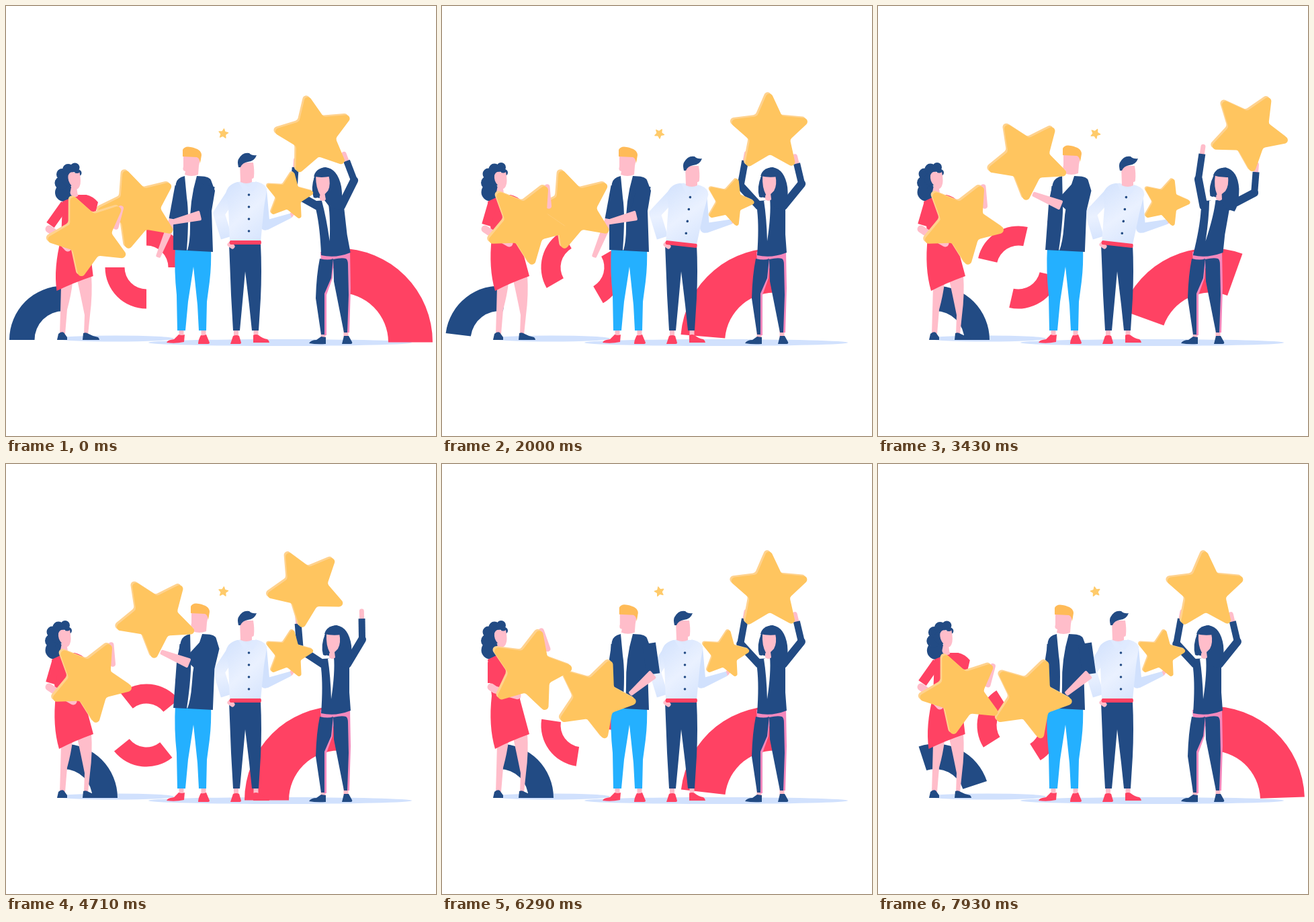
An HTML page with a canvas for the animation above (8 s loop, 640 by 640 pixels).

```html
<!DOCTYPE html>
<html lang="en">
<head>
<meta charset="utf-8">
<title>Team with stars</title>
<style>
html, body { margin: 0; height: 100%; overflow: hidden; background: #fff; }
canvas { display: block; width: 100vw; height: 100vh; }
</style>
</head>
<body>
<canvas id="stage"></canvas>
<script>
const LOOP = 8000;
const NAVY = '#224b84', RED = '#ff4263', SKIN = '#ffbdca', GOLD = '#ffc55f', EDGE = '#ffd28e';
const BLUE = '#24b0ff', ICE = '#d1e1fd', PALE = '#eaf1ff', HAIR = '#ffbb58', ROSE = '#f589bd';

const canvas = document.getElementById('stage');
const ctx = canvas.getContext('2d');
const density = Math.max(1, window.devicePixelRatio || 1);
canvas.width = canvas.height = 640 * density;

// ---- motion ----
// Eased step from 0 to 1 between two times, and a step up followed by a step down.
function ramp(t, from, to) {
  const u = Math.min(1, Math.max(0, (t - from) / (to - from)));
  return 0.5 - 0.5 * Math.cos(Math.PI * u);
}
const pulse = (t, up, top, down, end) => ramp(t, up, top) - ramp(t, down, end);

// Point at a distance and clockwise angle from straight up.
function polar(x, y, r, degrees) {
  const a = degrees * Math.PI / 180;
  return [x + r * Math.sin(a), y - r * Math.cos(a)];
}

// Elbow of an arm with two bones; side picks the direction it bends.
function elbow([sx, sy], [hx, hy], upper, fore, side) {
  const d = Math.min(Math.hypot(hx - sx, hy - sy), upper + fore);
  const bend = Math.acos((upper * upper + d * d - fore * fore) / (2 * upper * d));
  const a = Math.atan2(hy - sy, hx - sx) + side * bend;
  return [sx + upper * Math.cos(a), sy + upper * Math.sin(a)];
}

// ---- drawing ----
function shape(color, d) {
  ctx.fillStyle = color;
  ctx.fill(new Path2D(d));
}

function disc(color, x, y, rx, ry = rx) {
  ctx.beginPath();
  ctx.ellipse(x, y, rx, ry, 0, 0, 7);
  ctx.fillStyle = color;
  ctx.fill();
}

function line(color, width, points, cap = 'round') {
  ctx.beginPath();
  points.forEach(p => ctx.lineTo(...p));
  ctx.lineWidth = width;
  ctx.lineCap = cap;
  ctx.lineJoin = 'round';
  ctx.strokeStyle = color;
  ctx.stroke();
}

function roundPoly(color, points, radius) {
  const middle = (p, q) => [(p[0] + q[0]) / 2, (p[1] + q[1]) / 2];
  ctx.beginPath();
  ctx.moveTo(...middle(points[0], points[points.length - 1]));
  points.forEach((p, i) => ctx.arcTo(...p, ...middle(p, points[(i + 1) % points.length]), radius));
  ctx.closePath();
  ctx.fillStyle = color;
  ctx.fill();
}

function taper(color, [x0, y0], w0, [x1, y1], w1) {
  const a = Math.atan2(y1 - y0, x1 - x0), nx = Math.sin(a) / 2, ny = -Math.cos(a) / 2;
  roundPoly(color, [[x0 + nx * w0, y0 + ny * w0], [x1 + nx * w1, y1 + ny * w1],
    [x1 - nx * w1, y1 - ny * w1], [x0 - nx * w0, y0 - ny * w0]], 2);
}

function within(apply, draw) {
  ctx.save();
  apply();
  draw();
  ctx.restore();
}
const moved = (x, y, draw) => within(() => ctx.translate(x, y), draw);
// Slides the points at the given height above the base sideways.
const sheared = (shift, base, height, draw) =>
  within(() => ctx.transform(1, 0, -shift / height, 1, shift * base / height, 0), draw);
const turned = (degrees, x, y, draw) => within(() => {
  ctx.translate(x, y);
  ctx.rotate(degrees * Math.PI / 180);
  ctx.translate(-x, -y);
}, draw);

// Quarter ring; the angle is its clockwise end, counted up from the right.
function ring(color, x, y, outer, inner, angle) {
  const end = -angle * Math.PI / 180, start = end - Math.PI / 2;
  ctx.beginPath();
  ctx.arc(x, y, outer, start, end);
  ctx.arc(x, y, inner, end, start, true);
  ctx.closePath();
  ctx.fillStyle = color;
  ctx.fill();
}

function flatStar(color, x, y, size, turn) {
  const points = Array.from({ length: 10 }, (_, i) =>
    polar(x, y, size * (i % 2 ? 0.525 : 1.11), turn + i * 36));
  roundPoly(color, points, size * 0.09);
}

function star(x, y, size, turn) {
  const d = size / 40;
  flatStar(EDGE, x - d * 1.4, y - d * 1.2, size, turn);
  flatStar(GOLD, x + d * 0.3, y + d * 0.3, size, turn);
}

function ankles(x1, x2) {
  [x1, x2].forEach(x => line(SKIN, 7, [[x, 480], [x, 493]], 'butt'));
}

// ---- background ----
function background(t) {
  disc(ICE, 163, 495, 87, 4.6);
  disc(ICE, 408, 501, 196, 5);
  ring(RED, 495, 500.5, 140, 74,
    87 * ramp(t, 0, 2200) - 35 * ramp(t, 2200, 2750) + 38 * ramp(t, 2750, 4150) - 90 * ramp(t, 5900, 8150));
  ring(NAVY, 85.5, 497, 80.5, 43, 90 - 90 * pulse(t, 1680, 3440, 7414, 9164));
  const spin = -0.03 * t;
  ring(RED, 209, 389, 61.5, 32.5, spin);
  ring(RED, 209, 389, 61.5, 32.5, spin + 180);
  flatStar('#ffcb6b', 323.5, 190, 8, 8 + 24 * Math.sin(t / 1480));
}

// ---- woman in the tracksuit ----
function raisedArm(shoulder, wrist, upper, fore, side) {
  const bend = elbow(shoulder, wrist, upper, fore, side);
  const dx = wrist[0] - bend[0], dy = wrist[1] - bend[1], k = 11 / Math.hypot(dx, dy);
  line(SKIN, 7, [wrist, [wrist[0] + dx * k, wrist[1] + dy * k]]);
  line(NAVY, 12, [shoulder, bend]);
  line(NAVY, 10, [bend, wrist], 'butt');
}

function trackWoman(t) {
  const start = 1 - ramp(t, 0, 860);
  const sway = pulse(t, 1950, 2900, 3450, 4450);
  const fling = pulse(t, 4250, 4710, 4710, 5450);
  const hop = pulse(t, 3900, 4300, 4300, 4700);
  const lean = 1.57 * sway - start;
  const x = 487 + 65 * sway - 40 * fling - 28 * start;
  const y = 189 - 2 * sway - 5 * fling + 4 * start - 9 * hop;
  const turn = -1 + 32 * sway - 28 * fling - 10 * start;

  // The hands slip off the star when it tips far.
  const slip = Math.max(0, turn) * 0.55, loose = Math.max(0, -turn - 11) * 1.4;
  const [lx, ly] = polar(x, y, 55, turn + 222);
  const [rx, ry] = polar(x, y, 61, turn + 139);

  ankles(472, 506);
  shape(ROSE, 'M468 366L512 364L513 420L511 486H506L500 400L487 390L486 405L477 430V490H473L470 400Z');
  shape(NAVY, 'M467 376Q480 379 487 376L484 405L474 428V489H469L461 435Q462 400 467 376Z');
  shape(NAVY, 'M487 377Q500 374 506 376Q509 378 509 385L510 430L508 486H503L488 410Z');
  shape(NAVY, 'M451 502Q454 497 462 497L469 492L476 493V503Q462 504 451 502Z');
  shape(NAVY, 'M500 503L503 491H510L515 500Q516 503 513 503Z');

  raisedArm([472 + lean * 8, 298], [lx - slip, ly + slip], 41, 38, -1);
  raisedArm([508 + lean * 9, 298], [rx + loose, ry + loose], 43, 31, 1);
  sheared(lean * 9, 370, 80, () => {
    shape(NAVY, 'M471 290L504 288Q512 291 511 304L511 340L513 367Q490 376 469 371Q472 330 469 304Z');
    shape('#fff', 'M479 290L488 287Q490 310 484 350Q483 315 479 290Z');
  });
  moved(lean * 14, 0, () => turned(lean * 3, 489, 288, () => {
    shape(NAVY, 'M474 256Q478 241 492 240Q510 243 514 270Q516 294 510 304L496 301L486 286L478 285Z');
    shape(SKIN, 'M476 252H496Q499 266 494 275L489 280L490 288Q486 292 481 288V281Q474 272 476 252Z');
    shape(NAVY, 'M475 253Q468 270 472 284Q477 287 482 281Q476 270 477 253Z');
    shape(NAVY, 'M474 253Q477 241 492 240Q500 243 499 254Q486 256 474 253Z');
  }));
  star(x, y, 60, turn);
}

// ---- man in the shirt ----
function shade(x0, y0, x1, y1) {
  const g = ctx.createLinearGradient(x0, y0, x1, y1);
  [ICE, PALE, ICE].forEach((c, i) => g.addColorStop(i / 2, c));
  return g;
}

function shirtMan(t) {
  const lean = pulse(t, 800, 1900, 3450, 4400);
  const nod = pulse(t, 5140, 5640, 5640, 6300);
  const toss = pulse(t, 6350, 6930, 6930, 7450);
  const x = 421 + lean * 7, y = 283 + lean * 9;
  const shoulder = [381 + lean * 6, 274 + lean * 4];
  const hand = [x + 3 - toss * 10, y + 29 - toss * 13];
  const bend = elbow(shoulder, hand, 53, 41, 1);

  ankles(342.5, 372);
  shape(NAVY, 'M332 354H379Q381 395 379 435L376 483H366L362 445L356 395L352 440L348 483H338L335 430Z');
  shape(RED, 'M334 503L338 491Q343 489 347 491L350 501Q350 503 348 503Z');
  shape(RED, 'M368 501V490Q372 488 376 490Q382 495 389 496Q392 498 392 501Z');

  line(SKIN, 6, [hand, [hand[0] + 3, hand[1] - 4]]);
  line(ICE, 14, [shoulder, bend]);
  taper(ICE, bend, 15, hand, 7);
  line(shade(320, 270, 335, 355), 17, [[338 + lean * 7, 277 + lean * 2], [317, 309], [328, 345]], 'butt');
  line(SKIN, 7, [[333, 355], [337, 358]]);

  turned(lean * 6.5, 334, 352, () => {
    shape(shade(322, 262, 398, 352), 'M344 262H375Q387 265 388 274L384 300L379 351H333L331 300L327 280Q329 266 344 262Z');
    shape(RED, 'M334 349H379Q381 352 379 355H334Q331 352 334 349Z');
    shape('#dfeaff', 'M346 262L350 261L361 270L372 261L375 263L367 277L361 270L355 277Z');
    for (let i = 0; i < 4; i++) disc(NAVY, 361.5, 281 + i * 18, 1.8);
  });
  moved(lean * 14 + nod * 6, lean * 5 + nod * 3, () => {
    shape(SKIN, 'M348 233H368Q370 245 369 254Q369 257 366 257V262Q358 266 349 262Z');
    shape(NAVY, 'M346 240Q344 231 346 228Q352 217 362 219Q366 223 373 222Q370 231 360 232Q352 233 349 240Z');
  });
  star(x - toss * 8, y - toss * 28, 37, 9 + lean * 9);
}

// ---- man in the jacket ----
function jacketMan(t) {
  const raise = pulse(t, 2250, 3250, 4720, 5560);
  const drop = ramp(t, 4720, 5560);
  const nod = pulse(t, 4720, 5560, 5700, 6500);
  const away = raise + drop;
  const x = 197 + 26 * raise + 31 * drop, y = 302 - 74 * raise + 47 * drop;
  const turn = -20 + 59 * raise - 30 * drop;
  const shoulder = [301 + raise * 3 + drop * 7, 267 - raise * 4];
  const hand = polar(x, y, 52, turn + 133);
  const bend = elbow(shoulder, hand, 46, 46, -1);

  ankles(261, 294);
  shape(BLUE, 'M252 358H305Q306 385 303 410L299 440L298 483H287L285 445L279 388L271 440L267 483H255L254 430Q250 395 252 358Z');
  shape(RED, 'M239 501Q240 497 250 496L257 489Q262 491 266 489L265 500Q252 503 239 501Z');
  shape(RED, 'M286 503Q286 497 290 490Q294 491 298 489L303 501Q303 503 301 503Z');

  taper(SKIN, [249 + away * 8, 318], 13, [226 + away * 34, 374 - away * 44], 7);
  sheared(raise * 8, 364, 110, () => {
    line(NAVY, 11, [[257, 268], [248 + away * 8, 317]], 'butt');
    shape('#fff', 'M264 252H286L278 300L274 363H267Z');
    shape(NAVY, 'M266 253Q254 256 253 264L249 290V363L269 364Q273 310 269 285Z');
  });
  moved(raise * 12 + nod * 5, -raise * 2 - nod, () => {
    shape(SKIN, 'M264 222H290L287 238L286 251Q276 255 266 251L267 246Q262 245 264 239Z');
    shape(HAIR, 'M263 224V214Q266 208 275 210Q291 213 291 222L289 234Q288 226 284 225Z');
  });
  sheared(raise * 8, 364, 110, () =>
    shape(NAVY, 'M284 253Q302 253 305 259L311 275L306 305L308 366L270 364Q274 350 274 330Q273 290 284 253Z'));
  line(NAVY, 20, [shoulder, bend], 'butt');
  star(x, y, 61.5, turn);
  taper(SKIN, bend, 15, hand, 7);
}

// ---- woman in the dress ----
function dressWoman(t) {
  const low = 1 - pulse(t, 800, 1900, 6900, 8000);
  const lift = pulse(t, 5000, 6930, 6930, 7930);
  const x = 125.5 - 2 * low + 7.5 * lift, y = 323 + 18 * low - 20 * lift;
  const turn = 28 + 20 * low - 19 * lift;
  const bend = [64 + lift * 12, 332];
  const hand = [100 - 8 * low + 16 * lift, 353 + 7 * low - 11 * lift];

  shape(SKIN, 'M82 416L99 412Q97 430 91 452L88 488H80L81 455Z');
  shape(SKIN, 'M106 408L127 400Q129 430 125 460L122 489H116L117 460Q111 430 106 408Z');
  shape(NAVY, 'M76 497L78 488Q82 484 86 486L91 493V497Z');
  shape(NAVY, 'M114 497L115 487Q119 485 123 488Q130 492 137 493Q139 495 139 497Z');

  moved(low * 14.5, low * 0.5, () => {
    disc(NAVY, 72, 277, 13.5);
    disc(NAVY, 68, 263, 10);
    disc(NAVY, 69, 250, 8.5);
    disc(NAVY, 78, 243, 8.5);
    disc(NAVY, 88, 240, 7);
    disc(NAVY, 93, 248, 5);
    disc(NAVY, 79, 258, 10);
  });
  sheared(low * 17, 400, 115, () =>
    shape(RED, 'M68 291Q85 283 90 281H102Q112 283 121 292L116 350L130 402Q102 412 79 424Q69 390 74 345Z'));
  line(RED, 14, [[75 + low * 13, 295], [bend[0] + 2, bend[1] - 6]], 'butt');
  line(SKIN, 11, [bend, [bend[0] + 6, bend[1] + 4], hand]);
  moved(low * 14.5, low * 0.5, () =>
    shape(SKIN, 'M78 252Q80 246 86 247Q92 250 95 247Q98 262 95 268Q93 272 91 272L92 279Q95 283 88 284Q81 282 81 277L83 267Q77 260 78 252Z'));
  line(SKIN, 8, [polar(x, y, 62, turn + 2), polar(x, y, 42, turn + 25)]);
  star(x, y, 63, turn);
}

const begin = performance.now();
function tick() {
  const t = (performance.now() - begin) % LOOP;
  ctx.setTransform(density, 0, 0, density, 0, 0);
  ctx.fillStyle = '#fff';
  ctx.fillRect(0, 0, 640, 640);
  [background, trackWoman, shirtMan, jacketMan, dressWoman].forEach(draw => draw(t));
  requestAnimationFrame(tick);
}
tick();
</script>
</body>
</html>
```
